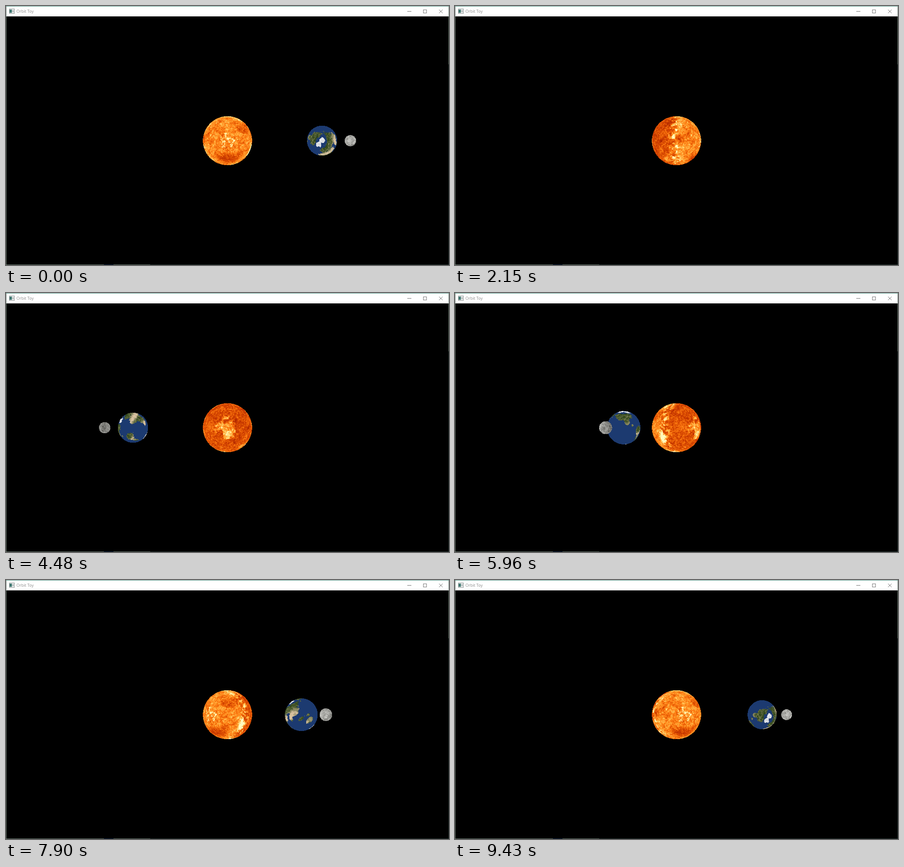
An HTML page with a canvas that plays this animation: 977x573 px, repeating every 9600 ms.

```html
<!DOCTYPE html>
<html lang="en">
<head>
<meta charset="utf-8">
<title>Orbit Toy</title>
<style>
  html, body { margin: 0; width: 100%; height: 100%; overflow: hidden; background: #000; }
  canvas { position: absolute; left: 0; top: 0; display: block; }
  #title { position: absolute; left: 23px; top: 5px; font: 9px/14px "Open Sans", "Noto Sans", sans-serif; color: #8c8c8c; white-space: nowrap; }
</style>
</head>
<body>
<canvas id="stage" width="977" height="573"></canvas>
<div id="title">Orbit Toy</div>
<script>
const ctx = document.getElementById('stage').getContext('2d');
const RAD = Math.PI / 180, LOOP = 9600;
const CX = 488.5, CY = 298, DEPTH = 1850;
const mix = (a, b, k) => a + (b - a) * k;
const clamp = v => Math.max(0, Math.min(1, v));
const bell = (v, w) => Math.exp(-((v / w) ** 2));

// ---- noise ----
function hash(x, y, z) {
  let h = Math.imul(x, 374761393) ^ Math.imul(y, 668265263) ^ Math.imul(z, 1442695041);
  h = Math.imul(h ^ (h >>> 13), 1274126177);
  return ((h ^ (h >>> 16)) >>> 0) / 4294967296;
}
function noise(p, f, seed = 0) {
  const x = p[0] * f + 50, y = p[1] * f + 50, z = p[2] * f + 50 + seed * 97;
  const i = Math.floor(x), j = Math.floor(y), k = Math.floor(z);
  const s = t => t * t * (3 - 2 * t);
  const u = s(x - i), v = s(y - j), w = s(z - k);
  const row = (b, c) => mix(hash(i, b, c), hash(i + 1, b, c), u);
  return mix(mix(row(j, k), row(j + 1, k), v), mix(row(j, k + 1), row(j + 1, k + 1), v), w);
}
const fbm = (p, f, seed) => noise(p, f, seed) * .5 + noise(p, f * 2, seed) * .3 + noise(p, f * 4, seed) * .2;

// ---- textures ----
// round patch on a sphere; sizes in degrees, edge value 1/e
function patch(lon, lat, lon0, lat0, w, h = w) {
  const d = ((lon - lon0 + 540) % 360 - 180) * Math.cos(lat0 * RAD);
  return bell(d, w) * bell(lat - lat0, h);
}
function bake(w, shade) {
  const h = w / 2, data = new Uint8Array(w * h * 3);
  for (let y = 0; y < h; y++) for (let x = 0; x < w; x++) {
    const lon = (x + .5) / w * 360 - 180, lat = 90 - (y + .5) / h * 180;
    const c = Math.cos(lat * RAD);
    const p = [c * Math.sin(lon * RAD), -c * Math.cos(lon * RAD), Math.sin(lat * RAD)];
    data.set(shade(p, lon, lat).map(v => 255 * clamp(v / 255)), (y * w + x) * 3);
  }
  return { w, h, data };
}

// warm north, dark south, bright equator and poles
function sunShade(p, lon, lat) {
  const at = (...spot) => patch(lon, lat, ...spot);
  const cloud = fbm(p, 4, 1) - .5, grain = noise(p, 20, 2) + noise(p, 42, 3) - 1;
  let v = mix(.37, .64, clamp((lat + 10 + cloud * 70) / 26));
  v += cloud * .45 + grain * .36;
  v += .5 * bell(lat, 13) * clamp((fbm(p, 9, 4) - .47) * 6);
  v += .4 * clamp((cloud * 50 - 62 - lat) / 7);
  v += .45 * clamp((lat - 68) / 5) * clamp(1.4 - Math.abs(fbm(p, 6, 5) - .5) / .04);
  v += .55 * at(66, 6, 8) + .4 * at(155, 11, 8) + .4 * at(-35, -18, 8);
  v -= .4 * at(2, 42, 30, 16) + .3 * at(-132, -9, 14) + .25 * at(125, 35, 16);
  v = clamp(v);
  return [165 + 155 * v, 38 + 212 * v ** 1.6, 190 * v ** 4];
}

function earthShade(p, lon, lat) {
  const at = (...spot) => patch(lon, lat, ...spot);
  const rough = fbm(p, 9, 6) - .5, fine = noise(p, 34, 7) - .5;
  const america = at(-102, 52, 26, 17) + at(-145, 64, 9, 7) + at(-105, 27, 8, 9) + at(-88, 14, 5, 4)
    + at(-60, -9, 17, 15) + at(-67, -36, 6, 18);
  const africa = at(8, 20, 24, 15) + at(27, -6, 14, 27);
  const asia = at(15, 50, 14, 9) + at(95, 57, 43, 15) + at(105, 33, 18, 13) + at(48, 26, 11, 11) + at(78, 20, 6, 11);
  const islands = at(134, -25, 17, 10) + at(112, 0, 13, 5) + at(141, -5, 8, 4);
  const isLand = america + africa + asia + islands + rough * .6 + fine * .15 > .4;
  const arctic = Math.max(at(-42, 73, 9, 12) - .35, (lat - 79) / 20);
  const antarctic = (-70 - lat + 3 * Math.cos((lon - 100) * RAD)) / 20;
  if (Math.max(arctic, antarctic) + rough * .6 > 0) {
    const snow = 222 + fine * 60;
    return [snow, snow + 3, snow + 8];
  }
  if (!isLand) return [28, 58, 112];
  const belt = bell(Math.abs(lat) - 24, 10) * (.65 + .4 * Math.cos((lon - 20) * RAD));
  const v = clamp(belt + .75 * at(88, 38, 24, 9) + rough * 1.1 + fine * .5 + .12);
  return [mix(50, 216, v), mix(72, 194, v), mix(28, 160, v)];
}

function moonShade(p) {
  const v = 152 + 28 * p[2] + (fbm(p, 3, 8) - .5) * 120 + (noise(p, 16, 9) - .5) * 75;
  return [v, v, v - 4];
}

const sunMap = bake(720, sunShade), earthMap = bake(720, earthShade), moonMap = bake(240, moonShade);

// ---- drawing ----
const BX = 196, BY = 238, BW = 588, BH = 120;
const view = ctx.createImageData(BW, BH), pix = new Uint32Array(view.data.buffer);
const BLACK = 0xff000000;
const tilt = [.46, .57, .68];

// turn a point about the tilted axis
function spin(p, ang) {
  const [a, b, c] = tilt, [x, y, z] = p;
  const co = Math.cos(ang), si = Math.sin(ang), d = (a * x + b * y + c * z) * (1 - co);
  return [x * co + a * d + (b * z - c * y) * si,
          y * co + b * d + (c * x - a * z) * si,
          z * co + c * d + (a * y - b * x) * si];
}
function ball({ dist, size, map, self }, ang) {
  const co = Math.cos(ang), si = Math.sin(ang);
  const k = DEPTH / (DEPTH + dist * si), r = size * k, cx = CX + dist * co * k;
  for (let y = Math.floor(CY - r); y <= CY + r; y++) for (let x = Math.floor(cx - r); x <= cx + r; x++) {
    const nx = (x + .5 - cx) / r, ny = (CY - y - .5) / r, q = 1 - nx * nx - ny * ny;
    if (q < 0) continue;
    const nz = Math.sqrt(q);
    let p = [co * nx - si * nz, ny, si * nx + co * nz];
    if (self) p = spin(p, -self);
    const u = Math.floor((Math.atan2(p[0], -p[1]) / Math.PI + 1) / 2 * map.w) % map.w;
    const v = Math.min(map.h - 1, Math.floor(Math.acos(Math.max(-1, Math.min(1, p[2]))) / Math.PI * map.h));
    const i = (v * map.w + u) * 3, d = map.data;
    pix[(y - BY) * BW + x - BX] = (BLACK | d[i + 2] << 16 | d[i + 1] << 8 | d[i]) >>> 0;
  }
}
function scene(t) {
  const deg = t * .04035, ang = deg * RAD;
  const balls = [
    { dist: 0, size: 54.2, map: sunMap },
    { dist: 208.5, size: 33.3, map: earthMap, self: (deg % 360) * .89 * RAD },
    { dist: 271, size: 12.5, map: moonMap }
  ];
  if (Math.sin(ang) > 0) balls.reverse();
  pix.fill(BLACK);
  balls.forEach(b => ball(b, ang));
  ctx.putImageData(view, BX, BY);
}

function rect(color, x, y, w, h) {
  ctx.fillStyle = color;
  ctx.fillRect(x, y, w, h);
}
function chrome() {
  const edge = '#6f8076';
  rect('#000', 0, 0, 977, 573);
  rect('#fff', 0, 0, 977, 23);
  rect('#4d9484', 0, 0, 977, 1);
  rect(edge, 0, 1, 1, 572);
  rect(edge, 976, 1, 1, 128);
  rect('#2c3a38', 976, 129, 1, 444);
  rect(edge, 0, 572, 318, 1);
  rect('#12294a', 216, 572, 21, 1);
  rect('#2c3a38', 318, 572, 659, 1);
  // window icon
  rect('#8a8f8f', 7, 6, 12, 11);
  rect('#f4f6f6', 8, 7, 10, 9);
  rect('#3f7770', 8, 8, 5, 7);
  rect('#b4bcbc', 14, 9, 3, 5);
  // window buttons
  rect('#666', 885, 11.5, 9, 1);
  ctx.strokeStyle = '#777';
  ctx.strokeRect(920.5, 8.5, 7, 7);
  ctx.beginPath();
  ctx.moveTo(955, 8); ctx.lineTo(963, 16);
  ctx.moveTo(963, 8); ctx.lineTo(955, 16);
  ctx.stroke();
}

// ---- clock: bursts of eleven steps, each burst ending in a short hold ----
const FIRST = 90, BURST = 1092, STEP = 98;
function stepped(t) {
  const from = FIRST + Math.floor((t - FIRST) / BURST) * BURST;
  return Math.max(0, from + Math.min(10, Math.floor((t - from) / STEP)) * STEP);
}

let shown = -1;
const begin = performance.now();
function tick() {
  const t = stepped((performance.now() - begin) % LOOP);
  if (t !== shown) scene(shown = t);
  requestAnimationFrame(tick);
}
chrome();
tick();
</script>
</body>
</html>
```
